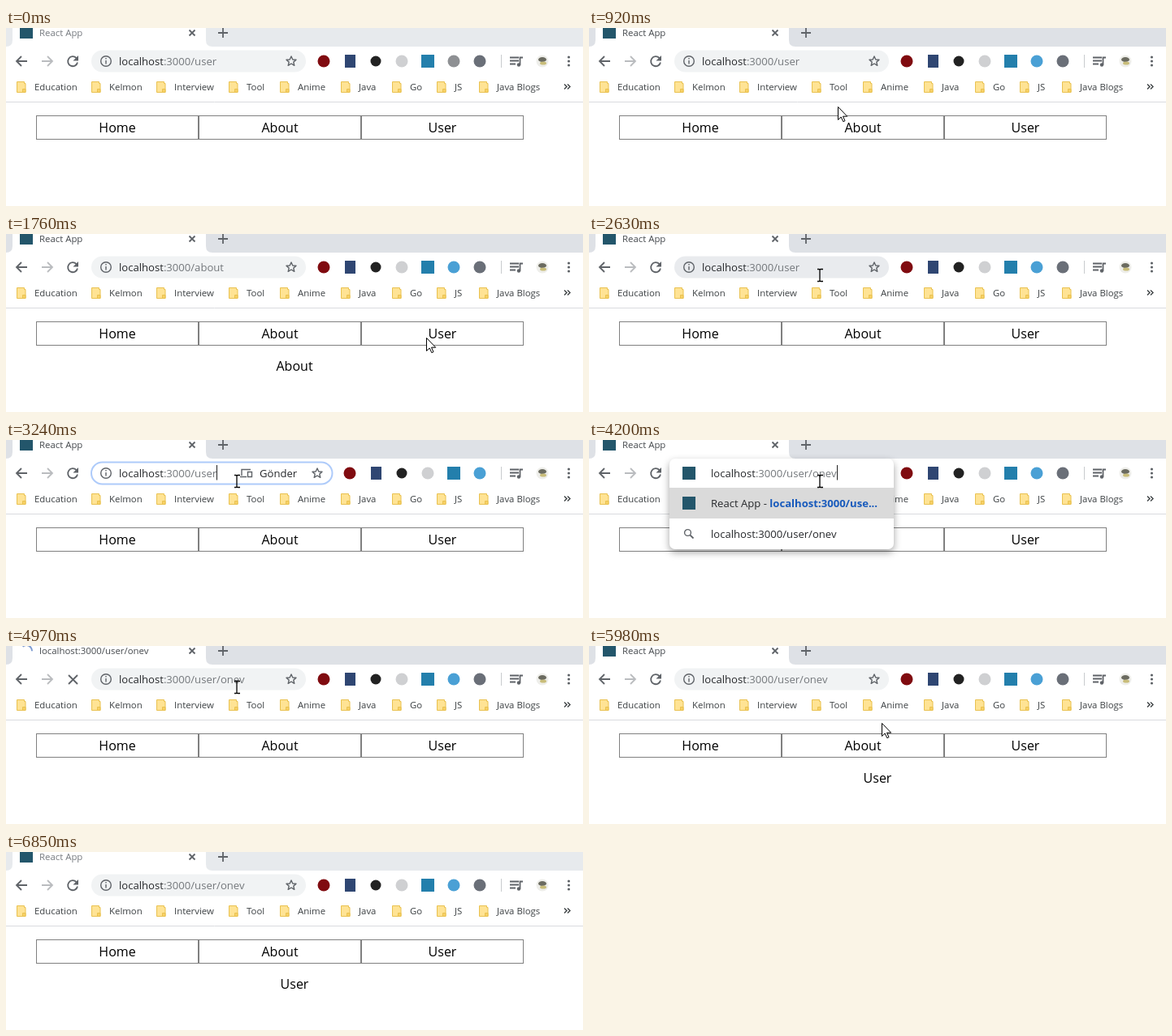
Animation of 710 by 220 pixels, one loop 6920 ms. Source, as an HTML page:

```html
<!DOCTYPE html>
<html lang="en">
<head>
<meta charset="utf-8">
<title>Router demo</title>
<style>
  html, body { margin: 0; width: 100%; height: 100%; overflow: hidden; background: #fff; }
  svg { display: block; width: 710px; height: 220px; font-family: "Open Sans", "Noto Sans", sans-serif; }
  text { white-space: pre; }
  .small { font-size: 11.4px; fill: #3c4043; }
  .ui { font-size: 13.1px; fill: #27292c; }
  .page { font-size: 16px; fill: #000; text-anchor: middle; }
  .line { fill: none; stroke: #5f6368; stroke-width: 1.8; }
  .thin { fill: none; stroke: #5f6368; stroke-width: 1.4; }
  .soft { fill: #74787c; }
  .link { fill: #185abc; font-weight: 700; }
  .picked tspan { fill: #fff; }
  #panel { filter: drop-shadow(0 4px 5px rgba(0, 0, 0, .36)); }
</style>
</head>
<body>
<svg viewBox="0 0 710 220">
  <defs>
    <rect id="favicon" x="-8" y="-8" width="16" height="16" fill="#23566b"/>
    <g id="folder">
      <path d="M.5 .5H9.5V2.5H11V13.5H.5Z" fill="#ffe394" stroke="#e9c14f"/>
      <path d="M7.5 13.5V9.5H11V13.5Z" fill="#f8d167" stroke="#e9c14f"/>
    </g>
    <path id="star" class="thin" stroke-linejoin="round" d="M0-6L1.8-2 6-1.7 2.8 1.1 3.8 5.3 0 3-3.8 5.3-2.8 1.1-6-1.7-1.8-2Z"/>
  </defs>

  <rect width="710" height="220" fill="#fff"/>

  <g id="nav"></g>
  <text id="content" class="page" x="355" y="168.5"></text>

  <rect id="strip" width="710" height="23"/>
  <path d="M0 23Q8 23 8 15V0H246V15Q246 23 254 23Z" fill="#fff"/>
  <use id="tabIcon" href="#favicon" x="25" y="5"/>
  <circle id="spinner" cx="25" cy="6" r="7" fill="none" stroke="#7d9bd0" stroke-width="2" stroke-dasharray="16 28"/>
  <text id="title" class="small" x="41" y="10"></text>
  <path class="line" stroke-width="1.5" d="M225.5 2.5l7 7m0-7l-7 7M261 6h12M267 0v12"/>

  <path class="line" d="M26 41H13.5M19 35L13 41l6 6"/>
  <path class="line" style="stroke:#babcbf" d="M44 41H56.5M51 35l6 6-6 6"/>
  <g id="reload">
    <path class="line" d="M86.6 37.2A6 6 0 1 0 88 42.5"/>
    <path d="M89 34v6.5H82.5Z" fill="#5f6368"/>
  </g>
  <path id="stop" class="line" d="M77 36l11 11m0-11l-11 11"/>

  <rect id="bar" x="105" y="27.5" height="27" rx="13.5"/>
  <g id="barIcons">
    <circle class="thin" cx="123" cy="41" r="6.3"/>
    <path class="thin" d="M123 40v4.5M123 37v1.6"/>
    <use id="barStar" href="#star" y="41"/>
  </g>
  <g id="send">
    <path class="thin" d="M290 44V36.5H301M288 45.5H296M297.5 39.5H302.5V45.5H297.5Z"/>
    <text class="ui" x="312" y="46">Gönder</text>
  </g>

  <g id="extensions" transform="translate(0 41)">
    <circle cx="391" r="7.5" fill="#800b10"/>
    <rect x="417" y="-8" width="13" height="16" fill="#2f4672"/>
    <circle cx="455" r="6.5" fill="#222"/>
    <circle cx="487" r="7.5" fill="#cfd0d2"/>
    <rect x="511" y="-8" width="16" height="16" fill="#237fac"/>
    <circle id="toggle" cx="551" r="7.5"/>
    <circle id="lastExt" cx="583" r="7.5" fill="#6a6f78"/>
  </g>
  <path d="M609.5 33v16" stroke="#c9cbce"/>
  <path class="line" d="M620 36.5h11M620 40.5h11M620 44.5h7M632.5 45.5V36.5H636"/>
  <circle cx="631" cy="45.5" r="2.2" fill="#5f6368"/>
  <circle cx="660" cy="41" r="7.5" fill="#eeeeea"/>
  <ellipse cx="660" cy="39" rx="5" ry="3" fill="#6b6b60"/>
  <ellipse cx="661" cy="43.5" rx="4" ry="2" fill="#c9bd7a"/>
  <path d="M692.5 36v.01M692.5 41v.01M692.5 46v.01" stroke="#5f6368" stroke-width="3.2" stroke-linecap="round"/>

  <g id="bookmarks"></g>
  <path class="thin" style="stroke:#3c4043" d="M687 69.5l3 3-3 3M691 69.5l3 3-3 3"/>
  <path d="M0 91.5H710" stroke="#d9dbde"/>

  <g id="popup">
    <rect id="panel" x="99" y="23" width="276" rx="7" fill="#fff"/>
    <rect x="99" y="59" width="276" height="38" fill="#dadada"/>
    <use href="#favicon" x="123" y="41"/>
    <g id="rows"></g>
    <g id="search">
      <circle class="thin" cx="121.5" cy="-1.5" r="3.9"/>
      <path class="line" d="M124.3 1.3l4.2 4.2"/>
      <text id="query" class="ui" x="150" y="5"></text>
    </g>
  </g>

  <rect id="selection" x="139" y="32" height="18" fill="#0078d7"/>
  <text id="url" class="ui" y="46"><tspan>localhost</tspan><tspan id="path" class="soft"></tspan></text>
  <path id="caret" d="M0 31V49.500" stroke="#222"/>

  <g id="cursor" stroke="#000" stroke-linejoin="round">
    <path id="arrow" fill="#fff" d="M.5 .5V16.500L4.200 13 6.800 18.700 9 17.700 6.500 12.200H11.700Z"/>
    <path id="hand" fill="#fff" d="M-1.500 12V2Q-1.500.5 0 .5T1.500 2V7Q4.500 6 5 8 7.500 7.300 8 9 10.500 8.700 10.500 11V15L8.500 19V21.500H-1V19L-5.500 13Q-6 10.500-4 10.500Z"/>
    <path id="beam" fill="none" stroke-width="1.300" d="M-3-7.500H-1Q0-7.500 0-6.500 0-7.500 1-7.500H4M0-6.500V6.500M-3 7.500H-1Q0 7.500 0 6.500 0 7.500 1 7.500H4"/>
  </g>
</svg>

<script>
const LOOP = 6920;
const USER = 'onev';
const HOST = 'localhost';
const el = id => document.getElementById(id);
const set = (id, attrs) => {
  for (const key in attrs) el(id).setAttribute(key, attrs[key]);
};
const show = (id, on) => { el(id).style.display = on ? '' : 'none'; };
const write = (id, text) => {
  if (el(id).textContent !== text) el(id).textContent = text;
};
const during = (t, from, to) => t >= from && t < to;
const ramp = (t, from, to) => Math.min(1, Math.max(0, (t - from) / (to - from)));
// Value of the latest entry that has started.
const held = (track, t) => track.reduce((last, entry) => entry[0] <= t ? entry : last);

const paths = [
  [0, '/user'], [1380, '/about'], [2080, '/user'], [3560, '/user/'],
  ...[...USER].map((_, i) => [[3710, 3880, 4030, 4200][i], '/user/' + USER.slice(0, i + 1)])
];
const contents = [[0, ''], [1380, 'About'], [2080, ''], [5280, 'User']];
const rowCounts = [[0, 5], [3880, 4], [4030, 3], [4200, 2]];
const cursors = [
  [0, ''],
  [130, 'arrow', 470, 205], [200, 'arrow', 440, 190], [280, 'arrow', 395, 168], [360, 'arrow', 361, 154],
  [760, 'arrow', 350, 138], [830, 'arrow', 330, 118], [910, 'arrow', 306, 97], [990, 'arrow', 294, 92],
  [1070, 'arrow', 300, 100], [1150, 'arrow', 310, 110], [1230, 'hand', 325, 114],
  [1610, 'hand', 340, 118], [1690, 'arrow', 420, 124], [1760, 'arrow', 517, 128], [1930, 'hand', 528, 128],
  [2160, 'arrow', 510, 118], [2230, 'arrow', 440, 95], [2310, 'arrow', 350, 65],
  [2390, 'beam', 290, 52], [2460, 'beam', 284, 51],
  [5980, 'arrow', 360, 95], [6060, 'arrow', 491, 147], [6140, '']
];

el('nav').innerHTML = ['Home', 'About', 'User'].map((name, i) => `
  <rect x="${37.5 + 200 * i}" y="108.5" width="199" height="29" fill="none" stroke="#808080"/>
  <text class="page" x="${137 + 200 * i}" y="128.5">${name}</text>`).join('');

el('bookmarks').innerHTML = Object.entries({
  Education: 35, Kelmon: 127, Interview: 207, Tool: 296, Anime: 359, Java: 434, Go: 497, JS: 552, 'Java Blogs': 604
}).map(([name, x]) => `
  <use href="#folder" x="${x - 22}" y="66"/>
  <text class="small" x="${x}" y="77">${name}</text>`).join('');

el('rows').innerHTML = [0, 1, 2, 3].map(i => `
  <g><use href="#favicon" x="123" y="${78 + 38 * i}"/>
  <text class="ui" x="150" y="${83 + 38 * i}">React App - <tspan class="link">${HOST}:3000/use...</tspan></text></g>`).join('');

function drawBar(t) {
  const open = ramp(t, 2780, 2960) * (1 - ramp(t, 3560, 3700));
  const focused = during(t, 2780, 3560);
  const popup = during(t, 3560, 4580);
  const selected = during(t, 2780, 3090);
  const path = held(paths, t)[1];
  const x = popup ? 150 : 139;

  set('bar', {
    width: 264 + 32.5 * open,
    fill: focused ? '#fff' : during(t, 2630, 2780) ? '#e9ebee' : '#f1f3f4',
    stroke: focused ? '#aecbfa' : 'none',
    'stroke-width': 2
  });
  set('barStar', { x: 351 + 32 * open });
  set('extensions', { transform: `translate(${32 * open} 41)` });
  set('lastExt', { opacity: open > 0 ? 0 : 1 });
  set('toggle', { fill: t < 600 ? '#8e9093' : '#4aa0d5' });
  show('send', focused && open > .6);

  write('path', ':3000' + path);
  set('url', { x, class: selected ? 'ui picked' : 'ui' });
  const width = el('url').getComputedTextLength();
  set('selection', { width });
  show('selection', selected);
  set('caret', { transform: `translate(${Math.round(x + width) + .5} 0)` });
  show('caret', during(t, 3090, 4580));

  show('popup', popup);
  const count = held(rowCounts, t)[1];
  set('panel', { height: 36 + 38 * count });
  [...el('rows').children].forEach((row, i) => { row.style.display = i < count - 1 ? '' : 'none'; });
  set('search', { transform: `translate(0 ${40 + 38 * count})` });
  write('query', HOST + ':3000' + path);
}

function drawTab(t) {
  const active = during(t, 530, 6850);
  const loading = during(t, 4580, 5430);
  set('strip', { fill: active ? '#dee1e6' : '#e7eaed' });
  set('title', { style: `fill:${active ? '#45494d' : '#777b80'}` });
  write('title', during(t, 4580, 5280) ? `${HOST}:3000/user/${USER}` : 'React App');
  show('tabIcon', !loading);
  show('spinner', loading);
  set('spinner', { transform: `rotate(${230 + (t - 4970) * .36} 25 6)` });
  show('reload', !loading);
  show('stop', loading);
}

function drawCursor(t) {
  const [, kind, x = 0, y = 0] = held(cursors, t);
  for (const name of ['arrow', 'hand', 'beam']) show(name, name === kind);
  set('cursor', { transform: `translate(${x} ${y})` });
}

function draw() {
  const t = performance.now() % LOOP;
  drawTab(t);
  drawBar(t);
  show('nav', !during(t, 5200, 5280));
  write('content', held(contents, t)[1]);
  drawCursor(t);
  requestAnimationFrame(draw);
}
draw();
</script>
</body>
</html>
```
